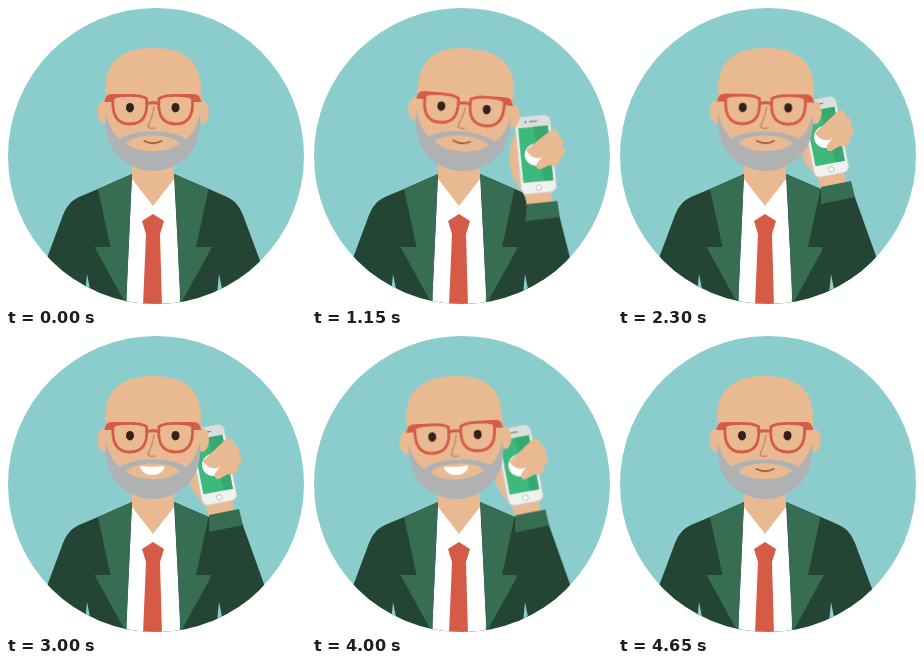
Animation, 300 px wide and 300 px high, one loop 5 s. Source, as an HTML page:

```html
<!DOCTYPE html>
<html lang="en">
<head>
<meta charset="utf-8">
<title>Phone call</title>
<style>
  html, body { margin: 0; width: 100%; height: 100%; overflow: hidden; background: #fff; }
  svg { display: block; width: 100vw; height: 100vh; }

  .sky { fill: #8bcccc; }
  .dark { fill: #244434; }
  .mid { fill: #376d52; }
  .skin { fill: #e9b992; }
  .white { fill: #fff; }
  .red { fill: #d55b47; }
  .beard { fill: #afb1b2; }
  .eye { fill: #36211a; }
  .rim { fill: none; stroke: #d55b47; stroke-width: 2.8; }
  .line { fill: none; stroke-linecap: round; stroke-linejoin: round; }

  .head, .arm, .lips, .grin { animation: 5s infinite; }
  .head {
    transform-origin: 147px 170px;
    animation-name: tilt;
    animation-timing-function: cubic-bezier(.45, 0, .45, 1);
  }
  .arm {
    transform-origin: 207px 131px;
    animation-name: lift;
  }
  .lips, .grin { animation-timing-function: step-end; }
  .lips { animation-name: lips; }
  .grin { transform-origin: 147px 132px; animation-name: grin; }

  @keyframes tilt {
    0%, 15% { transform: rotate(0deg); }
    29% { transform: rotate(6.3deg); }
    39% {
      transform: rotate(6.3deg);
      animation-timing-function: cubic-bezier(.4, 0, .2, 1);
    }
    50%, 63% { transform: rotate(0deg); }
    74%, 79% { transform: rotate(-3.2deg); }
    93%, 100% { transform: rotate(0deg); }
  }
  @keyframes lift {
    0%, 15% {
      transform: translate(50px, 185px) rotate(20deg);
      animation-timing-function: cubic-bezier(.35, 0, .55, .95);
    }
    23% {
      transform: translate(16.8px, 17.8px) rotate(5.5deg);
      animation-timing-function: cubic-bezier(.25, .4, .5, 1);
    }
    29% { transform: none; }
    79% {
      transform: none;
      animation-timing-function: cubic-bezier(.5, 0, .75, .6);
    }
    85% {
      transform: translate(16.8px, 17.8px) rotate(5.5deg);
      animation-timing-function: cubic-bezier(.45, .05, .65, 1);
    }
    93%, 100% { transform: translate(50px, 185px) rotate(20deg); }
  }
  @keyframes lips {
    0% { opacity: 1; }
    55% { opacity: 0; }
    86%, 100% { opacity: 1; }
  }
  @keyframes grin {
    0% { opacity: 0; transform: scale(.85, .6); }
    55% { opacity: 1; transform: scale(.85, .6); }
    60% { opacity: 1; transform: none; }
    86%, 100% { opacity: 0; transform: none; }
  }
</style>
</head>
<body>
<svg viewBox="0 0 300 300">
  <defs>
    <clipPath id="disc"><circle cx="150" cy="150" r="148"/></clipPath>
    <path id="lapel" class="mid" d="M126 168L92 183L104.500 241H88.500L121 300L120.500 290Z"/>
    <g id="lens">
      <path class="rim" d="M107 92C114 88.500 134 88.500 140.500 92.500C142 108 138 118 124 118C110 118 106 108 107 92Z"/>
      <path class="red" d="M98 96L100.500 90Q102 88 107 88H120L108 92L106 96Z"/>
      <ellipse class="eye" cx="124" cy="101.700" rx="4" ry="4.800"/>
    </g>
  </defs>

  <g clip-path="url(#disc)">
    <rect class="sky" width="300" height="300"/>

    <!-- torso -->
    <path class="dark" d="M126 168L92 183L73 191C64 195 60 202 57 209L41 252L33 275V300H261V275L253 252L237 209C234 202 230 195 221 191L203 183L168 168Z"/>
    <path class="white" d="M126 168L120 300H175L168 168Z"/>
    <path class="skin" d="M126 145H168V173L147 200L126 173Z"/>
    <use href="#lapel"/>
    <use href="#lapel" transform="matrix(-1 0 0 1 294.500 0)"/>
    <path class="red" d="M147 208L158 215L154 228L156 300H137L140 228L136 215Z"/>

    <!-- raised arm -->
    <g class="arm">
      <path class="dark" d="M204 193L236.500 190L258 250L286 328H205Z"/>
      <path class="skin" d="M194 103C180 108 177 138 187 156C193 167 202 170 203 184L228 179L225 155Z"/>
      <path class="mid" d="M203 181L233 175L237 191L203 198Z"/>
      <g transform="translate(207 131) rotate(-11)">
        <rect x="-17.500" y="-38.500" width="35" height="77" rx="6" fill="#f1f1ef" stroke="#cfd3d2"/>
        <path fill="#dcdedb" d="M-17 -28V-33Q-17 -38 -12 -38H12Q17 -38 17 -33V-28Z"/>
        <rect x="-15" y="-28" width="30" height="55" fill="#3db97c"/>
        <path d="M0 -28H15V27H6Z" fill="#38a871"/>
        <circle class="white" r="11"/>
        <path class="line" d="M-3 -33.500H4" stroke="#7d8484" stroke-width="1.300"/>
        <circle cx="-7" cy="-33.500" r="1" fill="#5d6565"/>
        <circle cy="33" r="2.700" fill="#fff" stroke="#b9bebe" stroke-width=".9"/>
      </g>
      <path class="skin" d="M197 127L219 106C223 102 229 105 228 111C233 110 235 116 232 120C237 121 237 128 232 131C234 136 228 142 222 140L213 145C209 146 207 141 210 138L214 132C209 137 200 133 197 127Z"/>
    </g>

    <path class="sky" d="M81 268L79 288H85Z"/>
    <path class="sky" d="M213 268L211 288H217Z"/>

    <!-- head -->
    <g class="head">
      <ellipse class="skin" cx="98" cy="106" rx="7" ry="11.500"/>
      <ellipse class="skin" cx="196" cy="106" rx="7" ry="11.500"/>
      <path class="skin" d="M99 84C99 55 116 42 147 42C178 42 195 55 195 84L194 112C190 142 172 160 147 160C122 160 104 142 100 112Z"/>
      <path class="beard" d="M100 108C103 120 107 128 114 133C127 123 167 123 180 133C187 128 191 120 194 108C195 122 193 132 189 140C181 155 164 165 147 165C130 165 113 155 105 140C101 132 99 122 100 108Z"/>
      <path class="skin" d="M120 137C130 127 164 127 174 137C164 148 130 148 120 137Z"/>
      <path class="line" d="M148 101C147 109 145 114 142.500 119C141.500 122 145 123 149 122" stroke="#cb8c68" stroke-width="1.500"/>
      <use href="#lens"/>
      <use href="#lens" transform="matrix(-1 0 0 1 293.500 0)"/>
      <path class="rim" d="M140 98Q147 95.500 154 98"/>
      <path class="line lips" d="M138.500 135Q147 139.500 155.500 135" stroke="#a8603c" stroke-width="1.900"/>
      <path class="white grin" d="M134 132Q147 133.500 158.500 132C157.500 144 135.500 144 134 132Z"/>
    </g>
  </g>
</svg>
</body>
</html>
```
